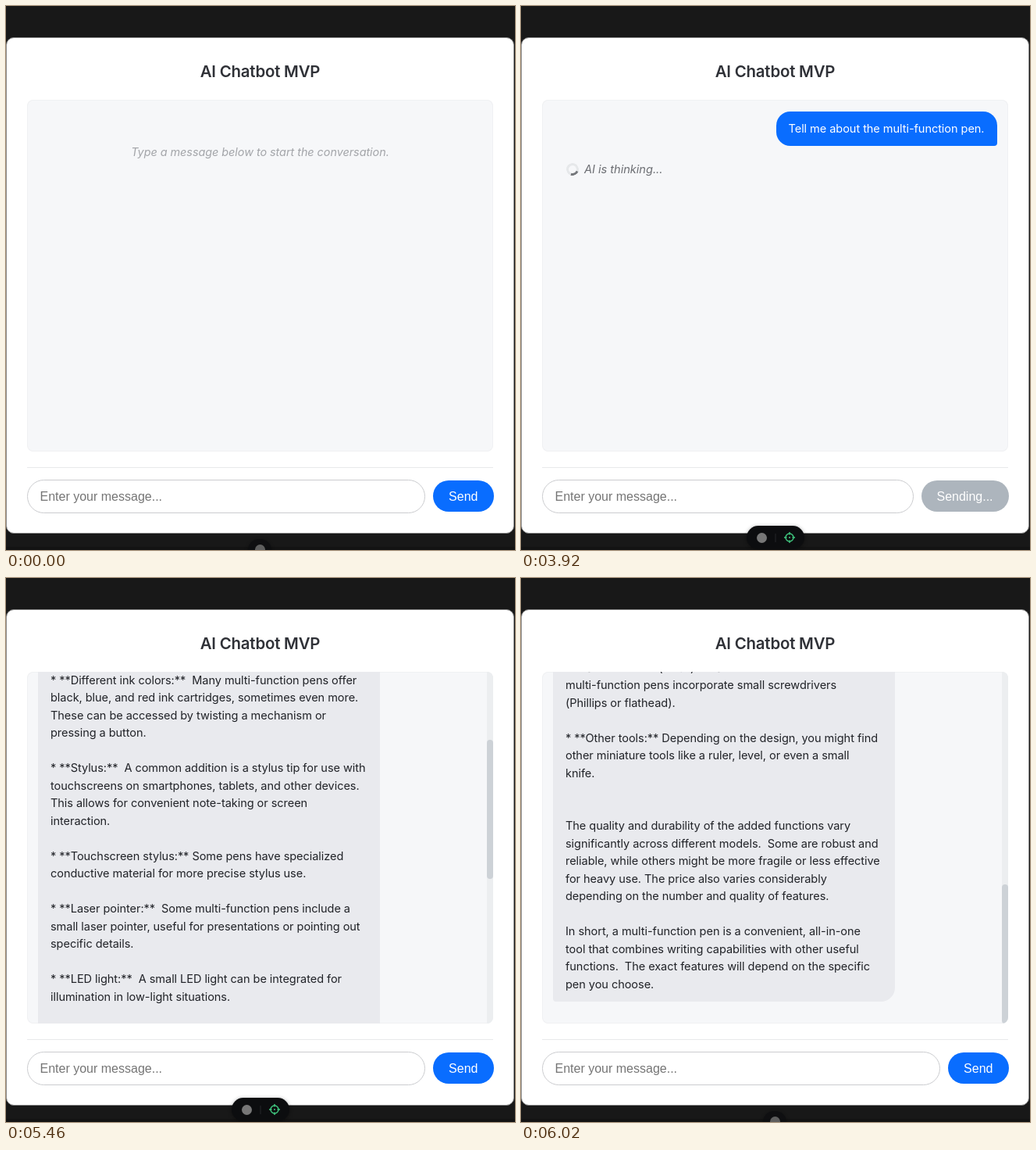
These frames come from a looping animation (652 px wide and 696 px high, 8000 ms). An HTML page:

```html
<!DOCTYPE html>
<html lang="en">
<head>
<meta charset="utf-8">
<title>Chatbot</title>
<style>
html, body { margin: 0; width: 100%; height: 100%; overflow: hidden; background: #181818; }
#stage { position: relative; width: 652px; height: 696px; overflow: hidden; color: #212328;
  font: 14.55px/22.5px Inter, "Open Sans", sans-serif; letter-spacing: -.06px; }
#stage div { position: absolute; box-sizing: border-box; white-space: pre; }
#floor { left: 0; top: 692px; width: 652px; height: 4px; background: #131313; }
#card { left: 0; top: 40px; width: 651px; height: 635px; border-radius: 10px; background: #fff;
  border: 1px solid #8b8b8b; }
#title { left: 0; top: 69px; width: 651px; text-align: center; color: #2f3137;
  font-size: 20.4px; line-height: 30px; font-weight: 600; letter-spacing: -.2px; }
#chat { left: 27px; top: 120px; width: 597px; height: 450px; border-radius: 8px; overflow: hidden;
  background: #f6f7f9; box-shadow: inset 0 0 0 1px #f0f1f3; }
#log { left: 0; top: 0; width: 100%; height: 1135px; }
#hint { left: 0; top: 56px; width: 100%; text-align: center; font-style: italic; color: #a3a5a9;
  font-size: 14.45px; }
.bubble { padding: 10.5px 16px; border-radius: 18px; }
#ask { top: 15px; color: #fff; background: #096dff; border-bottom-right-radius: 4px; }
#reply { left: 14px; top: 73px; width: 438px; background: #e9eaee; border-bottom-left-radius: 4px; }
#wait { left: 54px; top: 78px; font-style: italic; color: #6d6f74; font-size: 14.7px; }
#ring { left: -23.5px; top: 2.5px; width: 16px; height: 16px; border-radius: 50%;
  border: 3px solid #e6e8ea; border-top-color: #74777b; }
#track { right: 0; top: 0; width: 8px; height: 450px; background: #eceef0; }
#thumb { left: 0; width: 8px; height: 178.5px; border-radius: 4px; background: #cdd2d7; }
#rule { left: 27px; top: 590px; width: 597px; height: 1px; background: #e8e9eb; }
#field, #send { font: 16px/42px "Liberation Sans", Arial, sans-serif; letter-spacing: 0; }
#field { left: 26.5px; top: 606px; height: 42.5px; padding-left: 16px; border: 1px solid #cbcccf;
  border-radius: 21.5px; }
#field.focus { border-color: #80b3f5; box-shadow: 0 0 0 3px #c2daff; }
#caret { top: 11px; width: 1.5px; height: 18px; background: #111; }
#send { right: 27.5px; top: 607px; height: 40px; border-radius: 20px; text-align: center; color: #fff; }
#pill { overflow: hidden; background: #0c0d0f; border-radius: 15px; box-shadow: 0 1px 5px #0006; }
#badge { width: 13px; height: 13px; border-radius: 50%; background: #777; }
#tools { left: 0; top: 0; width: 74px; height: 30px; }
#tools svg { position: absolute; left: 0; top: 0; }
</style>
</head>
<body>
<div id="stage">
  <div id="floor"></div>
  <div id="card"></div>
  <div id="title">AI Chatbot MVP</div>
  <div id="chat">
    <div id="log">
      <div id="hint">Type a message below to start the conversation.</div>
      <div id="ask" class="bubble">Tell me about the multi-function pen.</div>
      <div id="wait"><div id="ring"></div>AI is thinking...</div>
      <div id="reply" class="bubble">A multi-function pen, also known as a multi-pen or multi-
tool pen, is a writing instrument that incorporates
additional tools beyond a standard pen.  These added
functions vary greatly depending on the specific pen, but
common examples include:

* **Different ink colors:**  Many multi-function pens offer
black, blue, and red ink cartridges, sometimes even more.
These can be accessed by twisting a mechanism or
pressing a button.

* **Stylus:**  A common addition is a stylus tip for use with
touchscreens on smartphones, tablets, and other devices.
This allows for convenient note-taking or screen
interaction.

* **Touchscreen stylus:** Some pens have specialized
conductive material for more precise stylus use.

* **Laser pointer:**  Some multi-function pens include a
small laser pointer, useful for presentations or pointing out
specific details.

* **LED light:**  A small LED light can be integrated for
illumination in low-light situations.

* **Screwdrivers (small):**  Some more tool-oriented
multi-function pens incorporate small screwdrivers
(Phillips or flathead).

* **Other tools:** Depending on the design, you might find
other miniature tools like a ruler, level, or even a small
knife.


The quality and durability of the added functions vary
significantly across different models.  Some are robust and
reliable, while others might be more fragile or less effective
for heavy use. The price also varies considerably
depending on the number and quality of features.

In short, a multi-function pen is a convenient, all-in-one
tool that combines writing capabilities with other useful
functions.  The exact features will depend on the specific
pen you choose.</div>
    </div>
    <div id="track"><div id="thumb"></div></div>
  </div>
  <div id="rule"></div>
  <div id="field"><span id="text"></span><div id="caret"></div></div>
  <div id="send"></div>
  <div id="pill">
    <div id="tools"><svg width="74" height="30" fill="none" stroke="#3fc77f" stroke-width="1.4">
      <path d="M37 10v11" stroke="#25272a" stroke-width="1"/>
      <circle cx="55" cy="15" r="5"/>
      <path d="M55 8v3.5M55 18.5v3.5M48 15h3.5M58.5 15h3.5"/>
      <circle cx="55" cy="15" r="1" fill="#3fc77f" stroke="none"/>
    </svg></div>
    <div id="badge"></div>
  </div>
</div>
<script>
const LOOP = 8000, FOCUS = 1120, PASTE = 1890, SEND = 2450, ANSWER = 5220;
const SCROLL = 685, BLUE = [9, 109, 255], GREY = [173, 181, 189];
const el = {};
for (const node of document.querySelectorAll('[id]')) el[node.id] = node;

const mix = (a, b, p) => a + (b - a) * p;
const show = (node, on) => { node.style.display = on ? '' : 'none'; };
const place = (node, box) => {
  for (const key in box) node.style[key] = box[key] + 'px';
};

// Cubic Bezier easing from (0,0) to (1,1), solved by bisection.
function bezier(x1, y1, x2, y2) {
  const at = (a, b, s) => 3 * a * s * (1 - s) ** 2 + 3 * b * s * s * (1 - s) + s ** 3;
  return x => {
    if (x <= 0) return 0;
    if (x >= 1) return 1;
    let lo = 0, hi = 1;
    for (let i = 0; i < 24; i++) {
      const mid = (lo + hi) / 2;
      if (at(x1, x2, mid) < x) lo = mid; else hi = mid;
    }
    return at(y1, y2, lo);
  };
}
const ease = bezier(.25, .1, .25, 1);
const easeInOut = bezier(.42, 0, .58, 1);

function drawChat(t) {
  const answered = t >= ANSWER;
  const scroll = SCROLL * easeInOut((t - ANSWER) / 614);
  show(el.hint, t < SEND);
  show(el.ask, t >= SEND);
  show(el.wait, t >= SEND && !answered);
  show(el.reply, answered);
  show(el.track, answered);
  el.ring.style.transform = `rotate(${(t - 2490) * .36}deg)`;
  el.log.style.transform = `translateY(${-scroll}px)`;
  place(el.ask, { right: answered ? 22.5 : 14.5 });
  place(el.thumb, { top: 271.5 * scroll / SCROLL });
}

function drawForm(t) {
  const busy = t >= SEND && t < ANSWER;
  const focus = t >= FOCUS && t < SEND;
  const pasted = focus && t >= PASTE;
  el.field.className = focus ? 'focus' : '';
  place(el.field, { width: busy ? 476 : 510.5 });
  el.text.textContent = pasted ? el.ask.textContent : 'Enter your message...';
  el.text.style.color = pasted ? '#222' : '#757575';
  show(el.caret, focus && (pasted || t < 1610));
  place(el.caret, { left: pasted ? 273.5 : 16 });

  // The colour starts back one paint after the answer.
  const grey = ease((t - SEND) / 200) - ease((t - ANSWER - 16) / 200);
  el.send.textContent = busy ? 'Sending...' : 'Send';
  el.send.style.background = `rgb(${BLUE.map((c, i) => mix(c, GREY[i], grey))})`;
  place(el.send, { width: busy ? 112 : 77.5 });
}

function drawPill(t) {
  const open = ease((t - 330) / 450) - ease((t - 5560) / 450);
  const width = mix(30, 74, open), height = mix(28, 30, open);
  place(el.pill, { left: mix(325, 326, open) - width / 2, top: mix(682, 665, open), width, height });
  place(el.badge, { left: mix(8.5, 13, open), top: mix(7, 8.5, open) });
  place(el.tools, { left: (width - 74) / 2 });
  el.tools.style.opacity = open ** 2;
  el.pill.style.opacity = mix(.75, 1, open);
}

function frame(now) {
  const t = now % LOOP;
  drawChat(t);
  drawForm(t);
  drawPill(t);
  requestAnimationFrame(frame);
}
frame(0);
</script>
</body>
</html>
```
